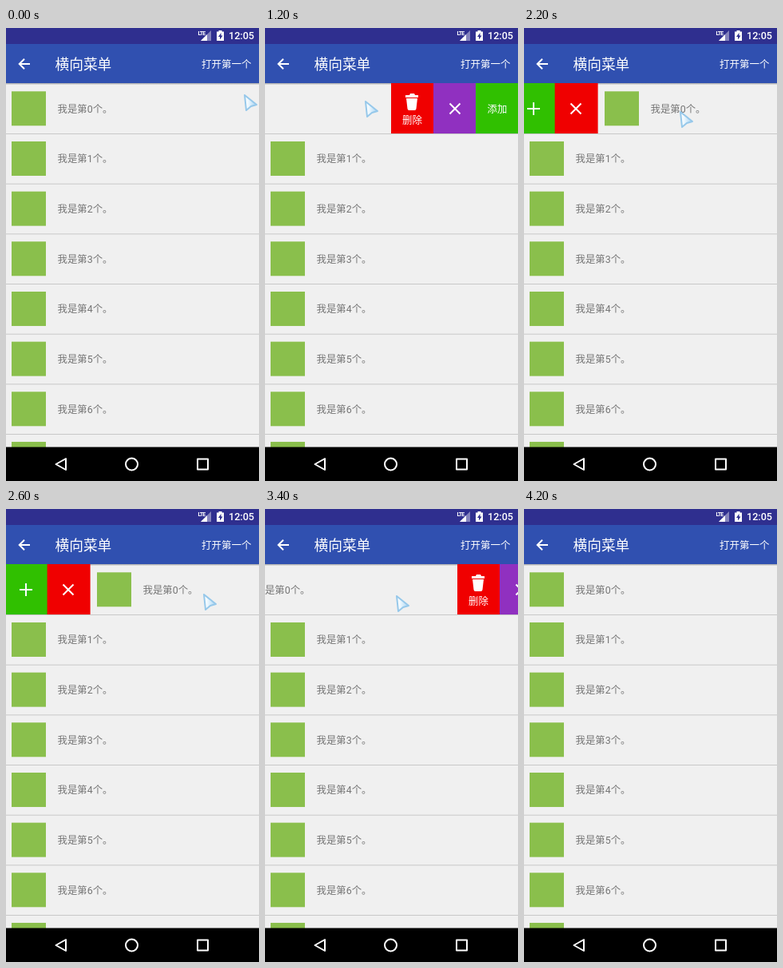
Recreate the animation shown at these times as an HTML page. Size 317 by 567 pixels, loop 4400 ms.

```html
<!DOCTYPE html>
<html lang="zh-CN">
<head>
<meta charset="utf-8">
<style>
html, body { margin: 0; width: 100%; height: 100%; overflow: hidden; background: #f0f0f0; }
svg { display: block; width: 317px; height: 567px; }
text { font: 12.4px Roboto, "Noto Sans CJK SC", "Noto Sans CJK", sans-serif; fill: #fff; }
.row text { fill: #757575; }
.line { fill: none; stroke: #fff; stroke-width: 2; }
</style>
</head>
<body>
<svg viewBox="0 0 317 567">
  <defs>
    <linearGradient id="shade" x2="0" y2="1">
      <stop stop-opacity=".3"/><stop offset="1" stop-opacity="0"/>
    </linearGradient>
    <linearGradient id="ice">
      <stop stop-color="#fff"/><stop offset=".3" stop-color="#eef8fe"/><stop offset="1" stop-color="#a4d2f2"/>
    </linearGradient>
  </defs>
  <rect width="317" height="567" fill="#f0f0f0"/>
  <g id="list"></g>
  <rect y="69" width="317" height="2.5" fill="url(#shade)"/>

  <g id="left">
    <rect x="-109" y="69" width="54" height="63" fill="#30c000"/>
    <rect x="-55.4" y="69" width="54" height="63" fill="#f00000"/>
    <path class="line" d="M-90 101h16M-82 93v16M-35.500 94.500l13 13m0-13l-13 13"/>
  </g>
  <g id="right">
    <rect x="318" y="69" width="53" height="63" fill="#f00000"/>
    <rect x="371" y="69" width="53" height="63" fill="#9030c0"/>
    <rect x="424" y="69" width="54" height="63" fill="#30c000"/>
    <path fill="#fff" d="M336 84h5l1-2h5l1 2h4v3h-16zM337 88h14l-1.500 13q-.3 2-2 2h-7q-1.700 0-2-2z"/>
    <text x="332" y="119.500">删除</text>
    <path class="line" d="M391.500 94.500l13 13m0-13l-13 13"/>
    <text x="438.500" y="105.500">添加</text>
  </g>

  <rect width="317" height="20" fill="#2f2f8f"/>
  <rect y="20" width="317" height="49" fill="#3050b0"/>
  <path class="line" stroke-width="1.800" d="M30 45H17.500M23 38.700L16.700 45l6.300 6.300"/>
  <text x="61.500" y="51.500" style="font-size:17.700px">横向菜单</text>
  <text x="245" y="49.700" style="font-size:12.500px">打开第一个</text>
  <text x="240.500" y="9" style="font-size:7px;font-weight:700;letter-spacing:-.8px">LTE</text>
  <path fill="#8585bd" d="M257 3v13h-13z"/>
  <path fill="#fff" d="M252 8v8h-8zM266.500 3h4v1.500h2.500V16h-9V4.500h2.500z"/>
  <path fill="#2f2f8f" d="M269.500 6l-3.500 5h2v3.500l3.500-5h-2z"/>
  <text x="279" y="14.300" style="font-size:12.600px;font-weight:500">12:05</text>

  <rect y="524.500" width="317" height="43" fill="#000"/>
  <path class="line" stroke-linejoin="round" d="M75 539v14l-12.500-7zM240 539.500h13v13h-13z"/>
  <circle class="line" cx="157.500" cy="546" r="7.500"/>

  <circle id="halo" cx="275" cy="45" r="13" fill="#fff" fill-opacity=".13"/>
  <path id="cursor" d="M1 1L16 13L9 15L3 20z" fill="url(#ice)" stroke="#96c8ea" stroke-width="2" stroke-linejoin="round"/>
</svg>
<script>
const $ = id => document.getElementById(id);
const STEP = 200, LOOP = 4400, PITCH = 188 / 3;

$('list').innerHTML = Array.from({ length: 8 }, (_, i) => `
  <g transform="translate(0 ${69.3 + i * PITCH})">
    <g class="row">
      <rect x="7" y="10" width="43" height="43" fill="#8abf4c"/>
      <text x="64.5" y="36.3">我是第${i}个。</text>
    </g>
    <rect y="62.7" width="317" height="1" fill="#c8c8c8"/>
  </g>`).join('');
const sliding = [document.querySelector('.row'), $('left'), $('right')];

const easeIn = k => p => p ** k;
const easeOut = k => p => 1 - (1 - p) ** k;
const linear = easeIn(1);

// Each move: first step, last step, end position, easing
const swipes = [
  [2, 4, [-160, 0], easeOut(6)],
  [7, 9, [0, 0], easeOut(6)],
  [9, 13, [107, 0], easeOut(3)],
  [14, 15, [0, 0], linear],
  [15, 18, [-160, 0], easeIn(1.8)],
  [19, 21, [0, 0], easeIn(2)]
];
const pointing = [
  [0, 1, [271, 49], linear],
  [1, 3, [271, 43], linear],
  [4, 5, [265, 51], linear],
  [5, 7, [114, 94], easeOut(3.8)],
  [7, 9, [98, 99], linear],
  [9, 15, [262, 107], easeOut(2.2)],
  [15, 18, [158, 108], easeOut(2.6)],
  [18, 20, [136, 154], easeOut(3)]
];

function position(origin, moves, n) {
  return moves.reduce((from, [a, b, to, ease]) => {
    const p = ease(Math.min(1, Math.max(0, (n - a) / (b - a))));
    return from.map((v, i) => v + (to[i] - v) * p);
  }, origin).map(Math.round);
}

const place = (el, [x, y]) => el.setAttribute('transform', `translate(${x} ${y})`);
const show = (el, on) => el.style.display = on ? '' : 'none';

function draw(time) {
  const n = Math.floor(time % LOOP / STEP);
  const slide = position([0, 0], swipes, n);
  for (const el of sliding) place(el, slide);
  place($('cursor'), position([298, 83], pointing, n));
  show($('cursor'), n < 21);
  show($('halo'), n === 3 || n === 4);
}

const start = performance.now();
function tick() {
  draw(performance.now() - start);
  requestAnimationFrame(tick);
}
tick();
</script>
</body>
</html>
```
